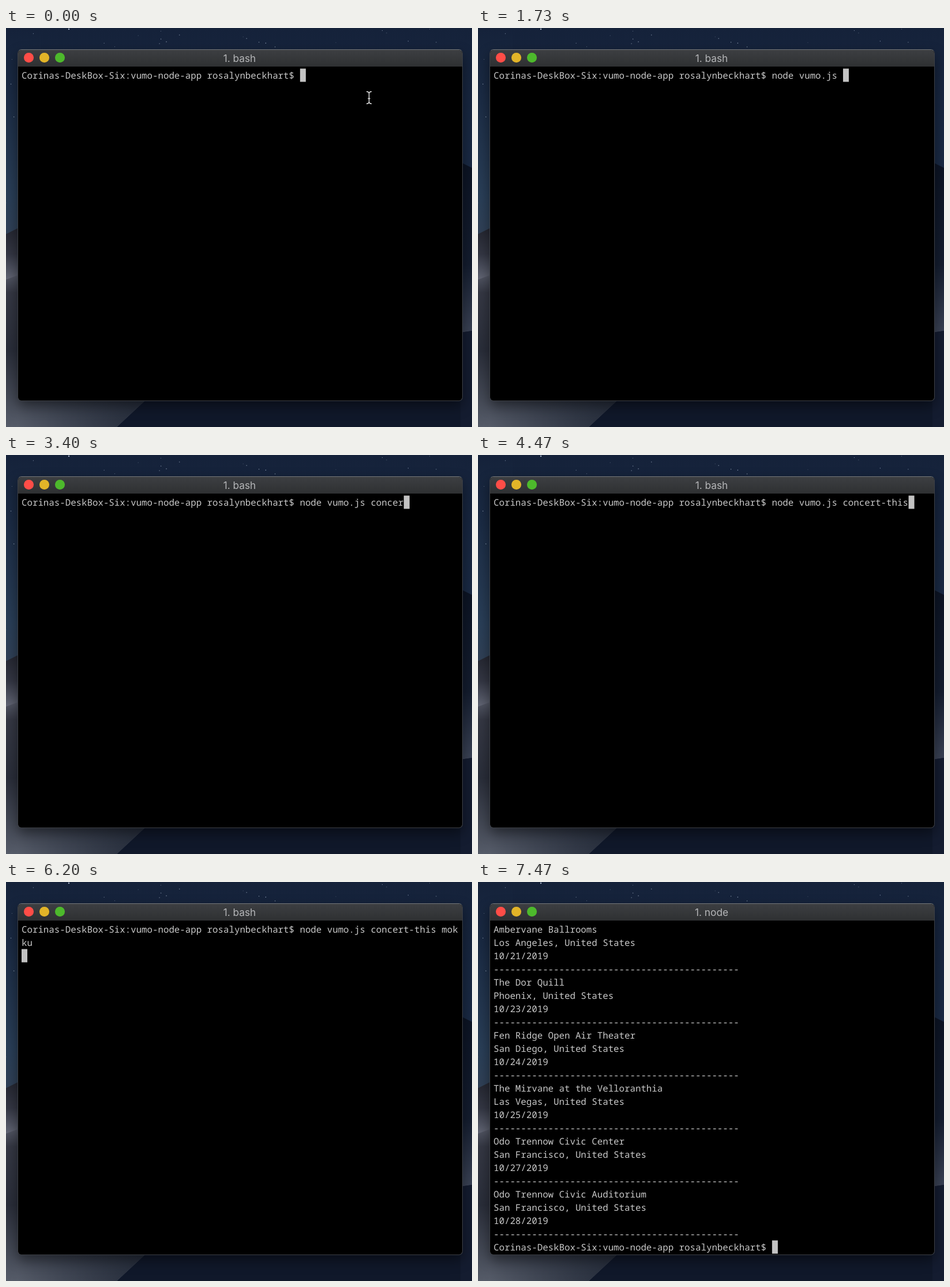
Recreate the animation shown at these times as an HTML page. Size 808 by 693 pixels, loop 7.59 s.

```html
<!DOCTYPE html>
<html lang="en">
<head>
<meta charset="utf-8">
<title>Terminal</title>
<style>
  html, body { margin: 0; width: 808px; height: 693px; overflow: hidden; background: #10192c; }
  svg { position: absolute; left: 0; top: 0; }
  #window {
    position: absolute; left: 20px; top: 37px; width: 772px; height: 611px; box-sizing: border-box;
    border: 1px solid #3d4046; border-top-color: #74777a; border-radius: 7px; background: #000;
    box-shadow: 0 9px 22px rgba(0, 0, 0, .45); overflow: hidden;
  }
  #bar {
    height: 29px; background: linear-gradient(#3d3f42, #2e3032);
    font: 17.3px/29px Inter, sans-serif; color: #b5b6b8; text-align: center; text-indent: -2px;
  }
  #bar i { position: absolute; top: 5px; width: 16.5px; height: 16.5px; border-radius: 50%; }
  #screen {
    position: absolute; left: 27px; top: 71px; margin: 0; color: #c8c8c8;
    font: 15.78px/23px "Noto Sans Mono", monospace; font-variant-ligatures: none;
    text-rendering: geometricPrecision;
  }
  #cursor { position: absolute; left: 0; top: 0; width: 9.5px; height: 23px; background: #c3c3c3; }
</style>
</head>
<body>
<svg width="808" height="693">
  <defs>
    <linearGradient id="sky" x2="0" y2="1">
      <stop stop-color="#15223a"/><stop offset=".15" stop-color="#1a2a43"/>
      <stop offset=".42" stop-color="#2a3f58"/><stop offset=".55" stop-color="#334257"/>
    </linearGradient>
    <linearGradient id="skyRight" x2="0" y2="1">
      <stop stop-color="#15223a"/><stop offset="1" stop-color="#1b2c47"/>
    </linearGradient>
    <linearGradient id="upperDune" x2="0" y2="1">
      <stop stop-color="#242630"/><stop offset=".5" stop-color="#343744"/><stop offset="1" stop-color="#666a79"/>
    </linearGradient>
    <linearGradient id="lowerDune" x2="0" y2="1">
      <stop stop-color="#555967"/><stop offset=".12" stop-color="#353844"/>
      <stop offset=".5" stop-color="#2a2e3a"/><stop offset="1" stop-color="#555b68"/>
    </linearGradient>
    <linearGradient id="shade"><stop stop-color="#1b2231" stop-opacity="0"/><stop offset="1" stop-color="#262d3b"/></linearGradient>
    <linearGradient id="rightDune" x2="0" y2="1">
      <stop stop-color="#0c1424"/><stop offset=".6" stop-color="#141d2f"/><stop offset="1" stop-color="#3b4356"/>
    </linearGradient>
  </defs>
  <path fill="url(#sky)" d="M0 0H400V693H0z"/>
  <path fill="url(#skyRight)" d="M60 0H808V300H60z"/>
  <path fill="#10182a" d="M190 300H808V693H190z"/>
  <g id="stars" fill="#a9b7cc"></g>
  <path fill="url(#upperDune)" d="M0 358L24 346V440H0z"/>
  <path fill="url(#lowerDune)" d="M0 437L24 428V600L240 648L192 693H0z"/>
  <path fill="url(#shade)" d="M20 648H240L192 693H20z"/>
  <path fill="url(#rightDune)" d="M788 233L808 243V526L788 529z"/>
  <path fill="#141c30" d="M788 529L808 526V693H788z"/>
</svg>
<div id="window">
  <div id="bar">
    <i style="left:10px;background:#ff4d47"></i><i style="left:37px;background:#e2b428"></i><i style="left:64px;background:#4db92c"></i>
    <span id="title"></span>
  </div>
</div>
<div id="cursor"></div>
<pre id="screen"></pre>
<svg id="pointer" width="808" height="693" fill="none" stroke-linecap="round">
  <defs><path id="beam" d="M625.5 110.5q4 0 4 4v13q0 4-4 4M633.5 110.5q-4 0-4 4v13q0 4 4 4M628 122.5h3"/></defs>
  <use href="#beam" stroke="#000" stroke-width="3"/>
  <use href="#beam" stroke="#e8e8e8" stroke-width="1.4"/>
</svg>
<script>
const LOOP = 7590, CELL = 9.468, ROW = 23, COLUMNS = 80;
const PROMPT = "Corinas-DeskBox-Six:vumo-node-app rosalynbeckhart$ ";
const TYPING_STARTS = 470, ENTER = 6200, BUSY = 6930, OUTPUT = 7270, DONE = 7330;

// Text, first key, last key: evenly spaced keystrokes, or all at once when the times are equal
const BURSTS = [
  ["node ", TYPING_STARTS, 800],
  ["vum", 1130, 1470],
  ["o.js ", 1730, 1730],
  ["co", 2600, 2600],
  ["ncert", 2730, 3600],
  ["-this", 4000, 4470],
  [" ", 4800, 4800],
  ["mokku", 5270, 5930]
];
const SHOWS = [
  ["Ambervane Ballrooms", "Los Angeles", 21],
  ["The Dor Quill", "Phoenix", 23],
  ["Fen Ridge Open Air Theater", "San Diego", 24],
  ["The Mirvane at the Velloranthia", "Las Vegas", 25],
  ["Odo Trennow Civic Center", "San Francisco", 27],
  ["Odo Trennow Civic Auditorium", "San Francisco", 28]
];

const $ = id => document.getElementById(id);
const listing = SHOWS.flatMap(([venue, city, day]) =>
  [venue, `${city}, United States`, `10/${day}/2019`, "-".repeat(45)]);

let seed = 7;
const random = () => (seed = seed * 16807 % 2147483647) / 2147483647;
const star = (width, height) =>
  `<circle cx="${random() * width}" cy="${random() * height}" r="${0.3 + random() * 0.4}"/>`;
for (let i = 0; i < 24; i++) $("stars").innerHTML += i % 6 ? star(808, 36) : star(20, 330);
$("stars").innerHTML += '<circle cx="109" cy="2" r="1.2"/>';

function typedAt(t) {
  return BURSTS.map(([text, first, last]) => {
    if (t < first) return "";
    if (t >= last) return text;
    return text.slice(0, 1 + Math.floor((t - first) / (last - first) * (text.length - 1)));
  }).join("");
}

function linesAt(t) {
  if (t >= OUTPUT) return [...listing, t >= DONE ? PROMPT : ""];
  const text = PROMPT + typedAt(t);
  const lines = [text.slice(0, COLUMNS)];
  if (text.length >= COLUMNS) lines.push(text.slice(COLUMNS));
  if (t >= ENTER) lines.push("");
  return lines;
}

function draw(t) {
  const lines = linesAt(t);
  const x = 27 + lines.at(-1).length * CELL, y = 70.5 + (lines.length - 1) * ROW;
  $("screen").textContent = lines.join("\n");
  $("cursor").style.transform = `translate(${x}px, ${y}px)`;
  $("title").textContent = t >= BUSY ? "1. node" : "1. bash";
  $("pointer").style.display = t < TYPING_STARTS ? "" : "none";
}

const start = performance.now();
function tick() {
  draw((performance.now() - start) % LOOP);
  requestAnimationFrame(tick);
}
tick();
</script>
</body>
</html>
```
